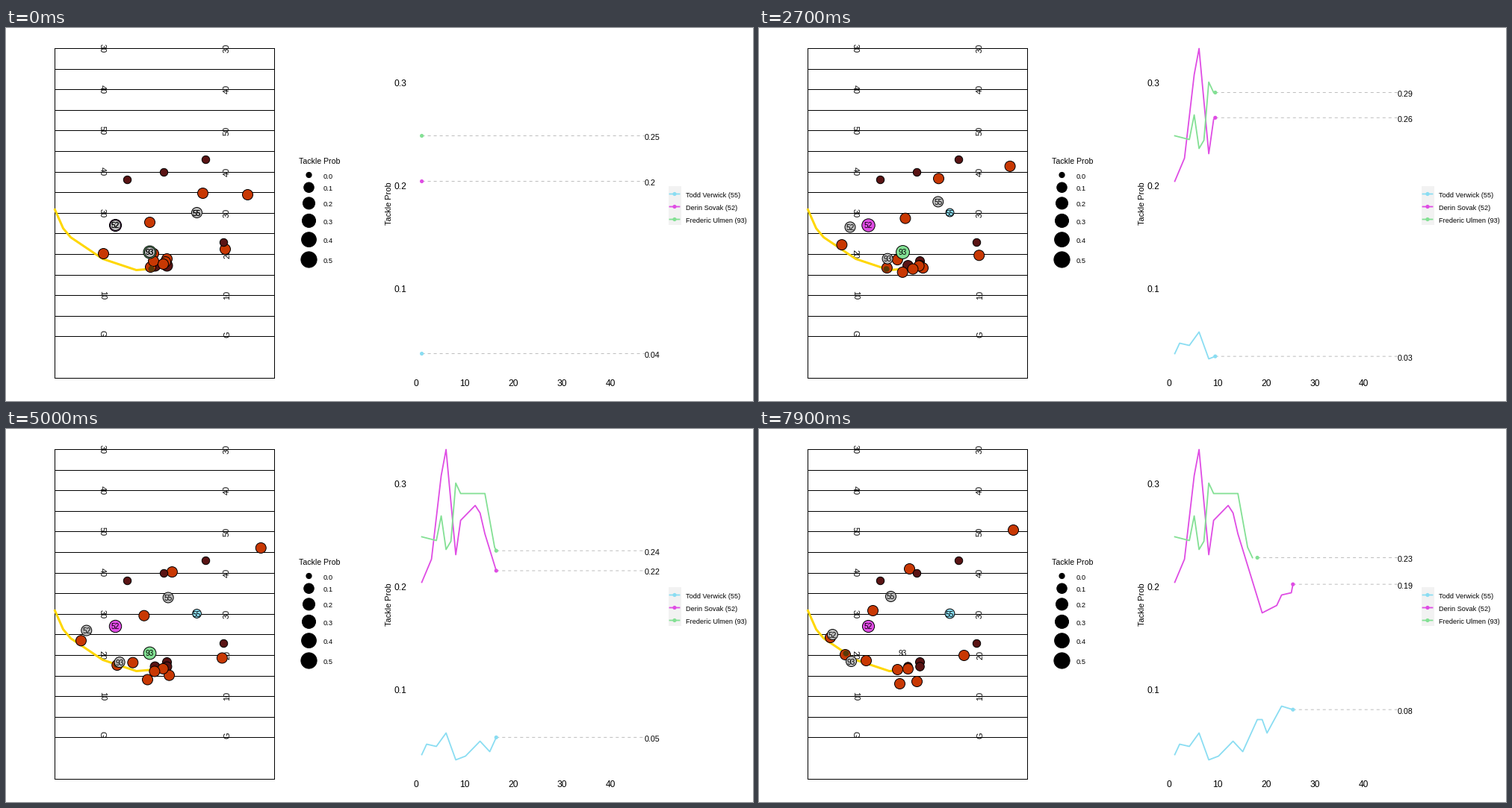
Recreate the animation shown at these times as a matplotlib script. Size 1000 px wide and 500 px high, loop 8 s.

```python
import numpy as np
import matplotlib.pyplot as plt
from matplotlib.animation import FuncAnimation
from matplotlib.patches import Circle, Rectangle

FRAMES, INTERVAL = 80, 100
LAST = FRAMES - 1
PT = 0.72  # points per pixel at 100 dpi
plt.rcParams["font.family"] = "Liberation Sans"

MAROON, ORANGE, GREY = "#5A1414", "#C83803", "#BEBEBE"
CYAN, PINK, GREEN = "#8ADDF2", "#DF4CE4", "#83E094"

fig = plt.figure(figsize=(10, 5), dpi=100, facecolor="white")
ax = fig.add_axes([0, 0, 1, 1])
ax.set_xlim(-0.5, 999.5)
ax.set_ylim(499.5, -0.5)
ax.axis("off")


def text(x, y, s, size, ha="center", rot=0, z=2):
    return ax.text(x, y, s, fontsize=size * PT, ha=ha, va="center_baseline",
                   rotation=rot, rotation_mode="anchor", zorder=z)


def line(xs, ys, color="black", width=1.0, z=1, **kw):
    return ax.plot(xs, ys, color=color, lw=width * PT, zorder=z,
                   snap=False, **kw)[0]


def dot(x, y, r, fill, z, edge="black"):
    return ax.add_patch(Circle((x, y), r, facecolor=fill, edgecolor=edge,
                               lw=PT, zorder=z))


def prob_radius(p):
    return 3.6 + 7 * np.sqrt(p / 0.5)


def glide(start, middle, end):
    """Path with constant acceleration through three positions."""
    a, b, c = map(np.array, (start, middle, end))

    def at(i):
        t = i / LAST
        return (a * (1 - t) * (1 - 2 * t) + b * 4 * t * (1 - t)
                + c * t * (2 * t - 1))
    return at


# Field
for j in [*range(15), 16]:
    y = round(27 + 27.6 * j)
    line([65, 359], [y, y])
for x in (65, 359):
    line([x, x], [27, 469])
for j, s in enumerate(["30", "40", "50", "40", "30", "20", "10", "G"]):
    y = 26.5 + 55.2 * j - 4 * (s == "G")
    text(129.5, y, s, 11, rot=-90)
    text(294.5, y + (s == "G"), s, 11, rot=90)

TRAIL = np.array([(65, 243), (76, 268), (86, 280), (129, 309), (174, 324),
                  (198, 322)])
line(*TRAIL.T, "#FFD700", 3, z=3)

# Size legend
text(391, 178, "Tackle Prob", 10.5, ha="left")
y = 196.5
for p in np.arange(6) / 10:
    dot(405, y, prob_radius(p), "black", 2)
    text(424, y + 1, f"{p:.1f}", 9.3, ha="left")
    y += prob_radius(p) + prob_radius(p + 0.1) + 6.4

# Chart axes
for p in (0.1, 0.2, 0.3):
    text(536, 487 - 1380 * p, f"{p:.1f}", 12, ha="right")
for v in range(0, 50, 10):
    text(548.7 + 6.51 * v, 475, str(v), 12)
text(511, 235, "Tackle Prob", 11, rot=90)
ax.add_patch(Rectangle((886, 211.5), 17, 52, color="#F2F2F2", lw=0, zorder=1))

# Players
routes = [
    ((263, 221), (230, 195), (201, 187)),
    ((323, 223), (339, 170), (340, 135)),
    ((192, 260), (191, 252), (152, 243)),
    ((130, 302), (104, 286), (95, 279)),
    ((293, 296), (292, 306), (274, 303)),
    ((193, 320), (159, 319), (115, 302)),
    ((197, 302), (177, 312), (143, 310)),
    ((215, 309), (219, 326), (211, 338)),
    ((197, 312), (190, 332), (188, 341)),
    ((213, 313), (212, 320), (199, 321)),
    ((210, 316), (202, 324), (185, 322)),
]
runners = [(dot(0, 0, 7, ORANGE, 6), glide(*r)) for r in routes]
ball = dot(0, 0, 4, "#5A3A08", 6.5, edge="none")

for x, y in [(162, 203), (211, 193), (267, 176), (291, 287)]:
    dot(x, y, 5.2, MAROON, 7)
dot(215, 312, 6, MAROON, 5)
line_pair = [dot(x, 318, 7.5, MAROON, 5) for x in (199, 215)]

# Chart steps fall on whole frames
STEPS = np.arange(1, 48)
STEP_FRAMES = np.round((STEPS - 1) * 149 / 46)


def chart_x(k):
    return 549.6 + 6.5 * k


class Defender:
    def __init__(self, name, num, color, route, turns, legend_y):
        """turns: (step, height) where the probability curve bends."""
        keys, heights = zip(*turns)
        self.n = keys[-1]
        self.steps = STEPS[:self.n]
        self.h = np.interp(self.steps, keys, heights)
        self.move = glide(*route)
        self.dash = line([], [], GREY, 1, z=2, dashes=(4, 4))
        self.curve = line([], [], color, 1.8, z=4)
        self.tip = dot(0, 0, 2.6, color, 5, edge="none")
        self.label = text(854, 0, "", 10.8, ha="left", z=6)
        self.ring = dot(*route[0], 8, color, 8)
        self.grey = dot(*route[0], 7, GREY, 9)
        text(*route[0], num, 10, z=10)
        self.tag = text(*route[0], num, 10, z=10)
        line([888, 901], [legend_y] * 2, color, 1.8, z=4)
        dot(894.5, legend_y, 2.6, color, 5, edge="none")
        text(909, legend_y + 1, f"{name} ({num})", 9.2, ha="left")

    def update(self, i, now):
        k = min(now, self.n)
        ended = now >= self.n
        x, y = chart_x(k), np.interp(k, self.steps, self.h)
        past = int(k) - ended
        xs, ys = chart_x(self.steps[:past]), self.h[:past]
        if not ended:
            xs, ys = np.append(xs, x), np.append(ys, y)
        self.curve.set_data(xs, ys)
        self.tip.center = x, y
        self.dash.set_data([x, 855], [y, y])
        near = self.h[int(k + 0.5) - 1]
        self.label.set_text(f"{round((487 - near) / 1380, 2):g}")
        self.label.set_y(y + 1.5)
        self.ring.set_radius(prob_radius((487 - y) / 1380))
        self.ring.set_visible(not ended)
        self.grey.center = self.move(i)
        self.tag.set_position(self.move(i))


defenders = [
    Defender("Todd Verwick", "55", CYAN,
             ((255, 247), (228, 228), (176, 224)),
             [(1, 436), (2, 422), (4, 425), (6, 407), (8, 443), (10, 438),
              (13, 418), (15, 432), (18, 389), (19, 389), (20, 407),
              (23, 371), (26, 377)], 222),
    Defender("Derin Sovak", "52", PINK,
             ((146, 264), (113, 268), (98, 275)),
             [(1, 205), (3, 174), (5, 62), (6, 27), (8, 168), (9, 122),
              (12, 102), (13, 112), (14, 140), (19, 246), (22, 236),
              (23, 222), (25, 219), (26, 185)], 239),
    Defender("Frederic Ulmen", "93", GREEN,
             ((192, 300), (161, 311), (123, 311)),
             [(1, 144), (4, 149), (5, 116), (6, 161), (7, 150), (8, 72),
              (9, 86), (14, 86), (16, 158), (17, 172), (18, 172)], 256),
]
ball_path = glide(194, 158, 116)


def draw(i):
    for patch, path in runners:
        patch.center = path(i)
    bx = ball_path(i)
    ball.center = bx, np.interp(bx, *TRAIL.T)
    for patch in line_pair:
        patch.set_radius(7.5 - 1.7 * i / LAST)
    now = np.interp(i, STEP_FRAMES, STEPS)
    for d in defenders:
        d.update(i, now)
    return []


anim = FuncAnimation(fig, draw, frames=FRAMES, interval=INTERVAL,
                     init_func=lambda: draw(0), repeat=True, repeat_delay=0)
plt.show()
```
